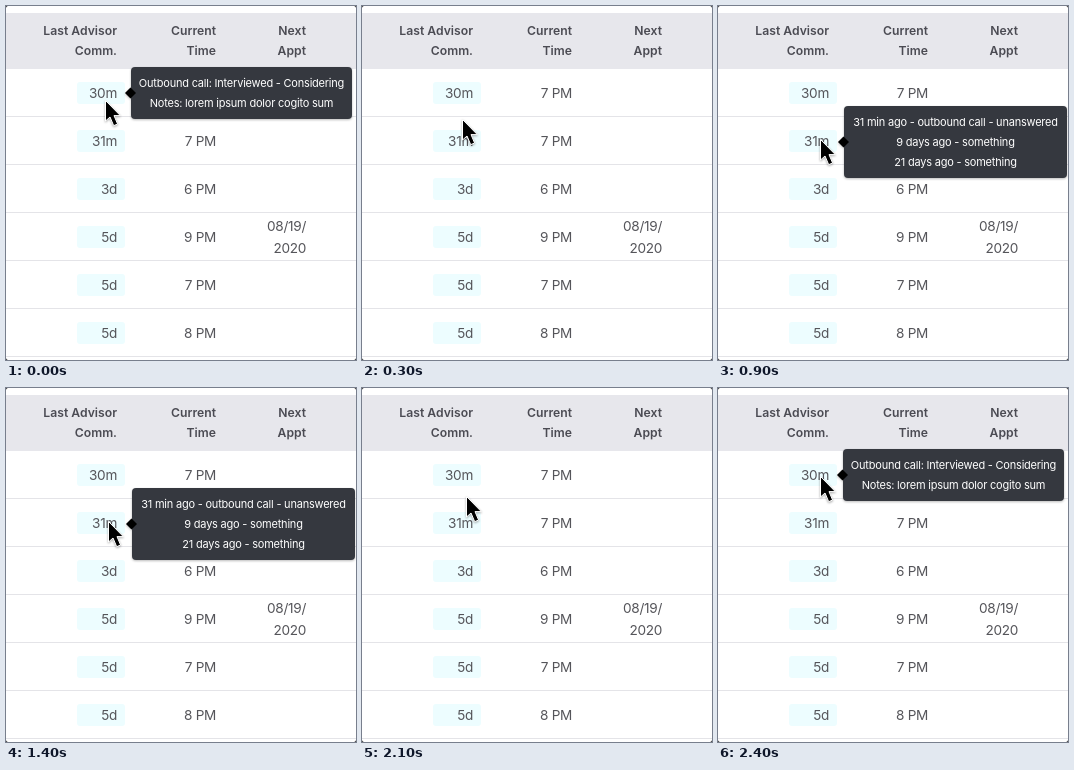
Write an HTML page that moves like this. It is 350 px wide and 354 px high and loops after 2.9 s.

```html
<!DOCTYPE html>
<html lang="en">
<head>
<meta charset="utf-8">
<title>Table tooltips</title>
<style>
html, body { margin: 0; width: 100%; height: 100%; overflow: hidden; background: #000; }
svg { display: block; width: 350px; height: 354px; background: #fff; border-radius: 2px; font-family: Inter, "Open Sans", sans-serif; }
.head { font-size: 12.2px; font-weight: 600; fill: #4b4b53; text-anchor: end; }
.cell { font-size: 13.6px; letter-spacing: -.3px; fill: #55555a; text-anchor: end; }
.tip { font-size: 11px; letter-spacing: -.21px; fill: #fff; text-anchor: middle; }
#tips { filter: drop-shadow(0 1px 1px #0004); }
#pointer { filter: drop-shadow(0 1px 1px #0005); }
</style>
</head>
<body>
<svg viewBox="0 0 350 354">
  <g id="table"></g>
  <g id="tips"></g>
  <path id="pointer" d="M.5.5V21L5 17 8.7 25.7 12.6 24 9 15.6H15.3Z" stroke="#fff"/>
</svg>
<script>
const $ = id => document.getElementById(id);
const text = (cls, x, y, s) => `<text class="${cls}" x="${x}" y="${y}">${s}</text>`;
const rect = (x, y, w, h, fill, r = 0) =>
  `<rect x="${x}" y="${y}" width="${w}" height="${h}" fill="${fill}" rx="${r}"/>`;
const rowY = i => 87 + 48 * i;

const [ageX, timeX, dateX] = [111, 210, 300];
const head = (x, a, b) => text("head", x, 29, a) + text("head", x, 49, b);
const row = (age, hour, i) => {
  const y = rowY(i);
  return rect(0, y + 23, 350, 1, "#e4e4e8") + rect(71, y - 11, 48, 22, "#edfdff", 3) +
    text("cell", ageX, y + 5, age) + text("cell", timeX, y + 5, hour + " PM");
};
const ages = ["30m", "31m", "3d", "5d", "5d", "5d"], hours = "776978";

$("table").innerHTML = rect(0, 7, 350, 56, "#e7e7ec") +
  head(ageX, "Last Advisor", "Comm.") + head(timeX, "Current", "Time") + head(dateX, "Next", "Appt") +
  ages.map((age, i) => row(age, hours[i], i)).join("") +
  text("cell", dateX, 225, "08/19/") + text("cell", dateX, 247, "2020");

// The box grows with its lines; the diamond points at the chip
const tip = (x, mid, w, lines) => {
  const h = 12 + 20 * lines.length, top = mid - h / 2;
  return `<g>${rect(x, top, w, h, "#35383f", 4)}<path d="M${x - 6} ${mid}l5.5-5.5 5.5 5.5-5.5 5.5z"/>` +
    lines.map((s, i) => text("tip", x + w / 2, top + 20 + 20 * i, s)).join("") + "</g>";
};
$("tips").innerHTML =
  tip(125, rowY(0), 221, ["Outbound call: Interviewed - Considering", "Notes: lorem ipsum dolor cogito sum"]) +
  tip(126, rowY(1) + 1, 223, ["31 min ago - outbound call - unanswered", "9 days ago - something", "21 days ago - something"]);

const linear = u => u;
const easeIn = u => u ** 2.5;
const easeOut = u => 1 - easeIn(1 - u);
const home = [99, 94];
const moves = [
  { start: 0, end: 400, to: [102, 133], ease: easeIn },
  { start: 1400, end: 1600, to: [107, 129], ease: linear },
  { start: 2000, end: 2400, to: [102, 88], ease: easeOut }
];
const pointerAt = t => moves.reduce((p, { start, end, to, ease }) => {
  const u = ease(Math.min(1, Math.max(0, (t - start) / (end - start))));
  return p.map((v, k) => v + (to[k] - v) * u);
}, home);

function draw(now) {
  const t = Math.floor(now % 2900 / 100) * 100; // ten poses a second
  const [x, y] = pointerAt(t).map(Math.round);
  $("pointer").setAttribute("transform", `translate(${x} ${y})`);
  // A tooltip shows while the pointer is over its chip
  [...$("tips").children].forEach((g, i) => {
    g.style.display = Math.abs(y - rowY(i)) <= 11 ? "" : "none";
  });
  requestAnimationFrame(draw);
}
draw(performance.now());
</script>
</body>
</html>
```
